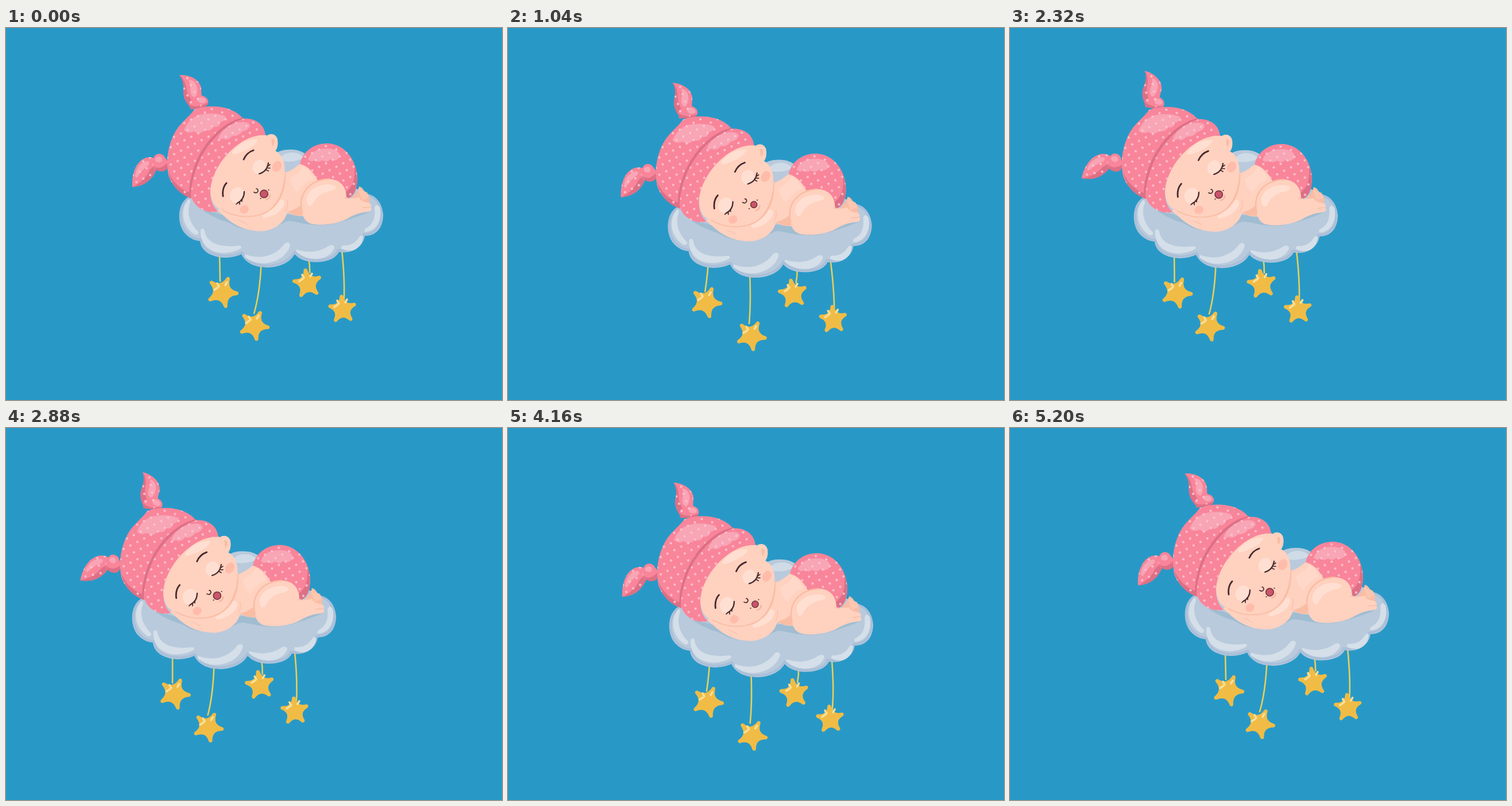
Animation, 864 px wide and 648 px high, one loop 5280 ms. Source, as an HTML page:

```html
<!DOCTYPE html>
<html lang="en">
<head>
<meta charset="utf-8">
<title>Sleeping baby on a cloud</title>
<style>
html, body { margin: 0; width: 100%; height: 100%; overflow: hidden; background: #2899c7; }
svg { display: block; width: 100vw; height: 100vh; }
.ln { fill: none; stroke-linecap: round; stroke-linejoin: round; }
.pink { fill: #f9859a; }
.rose { fill: #dd7086; }
.blush { fill: #f8a5b6; }
.skin { fill: #ffd1bf; }
.glow { fill: #ffdfd1; }
.shade { fill: #f9bda4; }
.gleam { fill: #d4dfe9; }
.ink { stroke: #46292c; }
</style>
</head>
<body>
<svg viewBox="0 0 864 648">
<defs>
  <pattern id="dots" width="19" height="19" patternUnits="userSpaceOnUse" patternTransform="rotate(18)">
    <circle cx="4.5" cy="4.5" r="2" fill="#fcc3cf"/>
    <circle cx="14" cy="14" r="2" fill="#fcc3cf"/>
  </pattern>
  <path id="crown" d="M328 142C344 134 392 131 413 158L420 170L352 230L324 296C307 290 292 279 284 260C278 238 280 210 293 184C303 165 319 155 328 142Z"/>
  <path id="brim" d="M412 158C432 156 450 166 452 187C412 183 362 232 356 280C355 298 360 312 369 319C352 325 324 313 322 288C322 232 362 172 412 158Z"/>
  <path id="pants" d="M512 237C517 214 538 200 561 201C592 203 611 231 612 262C612 282 606 296 589 297L545 270C538 253 526 240 512 237Z"/>
  <path id="earTop" d="M302 82C320 81 335 89 339 101C342 111 338 117 344 121L340 137L322 138C316 130 310 126 309 112C309 101 311 92 302 82Z"/>
  <path id="earSide" d="M220 277C218 249 231 225 251 225C258 225 262 229 264 234L262 246C255 264 241 276 220 277Z"/>
</defs>
<rect width="864" height="648" fill="#2899c7"/>
<g id="scene">
  <g id="charms"></g>

  <!-- cloud -->
  <path d="M318 294C296 309 298 345 314 360Q324 370 338 371C340 390 360 400 384 400Q400 399 410 394C420 414 442 418 460 417C482 415 496 406 503 394C514 407 535 409 551 407C568 404 576 398 580 390C604 394 622 381 625 362C648 362 657 344 657 325C655 302 642 291 626 289L560 250L530 228C520 214 505 211 491 212C478 212 466 218 460 230L340 290Z" fill="#b9cadc"/>
  <path class="ln" d="M317 297C299 311 301 343 316 358Q326 368 340 369C342 387 361 397 384 397Q400 396 411 391C421 411 442 415 460 414C480 412 495 403 503 390C515 404 535 406 550 404C567 401 575 396 578 387C602 391 620 378 623 360C646 359 654 343 654 325C653 305 643 294 630 291" stroke="#aabfd9" stroke-width="4"/>
  <path d="M474 231Q482 217 498 217Q511 217 519 226Q502 236 474 231Z" fill="#cfdce7"/>
  <g class="gleam">
    <path d="M317 299Q321 297 321 303C313 324 322 342 335 355Q336 361 329 360C304 343 304 315 317 299Z"/>
    <path d="M339 351Q344 347 346 353C349 377 378 383 407 379Q413 381 407 385C378 400 336 390 339 351Z"/>
    <path d="M416 394C443 404 469 398 486 375Q493 371 495 378C488 407 444 421 416 399Z"/>
    <path d="M506 386C529 393 546 390 563 379Q571 376 572 382C565 405 528 410 505 389Z"/>
    <path d="M585 379C600 380 610 374 616 363Q622 359 622 365C619 386 600 393 584 384Z"/>
    <path d="M625 350C639 343 644 332 642 313Q645 304 651 312C657 336 642 357 624 355Z"/>
  </g>
  <path d="M342 318Q370 321 390 331L520 323L612 316L634 320Q590 338 560 343C520 346 500 333 488 337Q445 361 403 347L388 339L373 334L358 327Z" fill="#a0bdd2"/>

  <!-- body -->
  <path class="skin" d="M474 255C496 252 507 240 514 235Q535 242 548 270L520 327Q499 330 480 315Z"/>
  <path class="glow" d="M495 261Q511 253 518 241Q530 248 535 262Q517 270 508 286Q497 278 495 261Z" opacity=".55"/>
  <path class="shade" d="M490 320Q502 318 513 309L520 326Q502 329 490 320Z"/>
  <path class="shade" d="M603 294Q613 287 615 276Q622 278 624 285Q631 285 630 291Q636 295 632 300Q636 306 629 309L607 308Z"/>
  <path class="skin" d="M613 281Q617 276 619 284Q626 281 627 288Q634 288 631 295L620 300Z" opacity=".45"/>
  <use href="#pants" class="pink"/>
  <path class="blush" d="M526 229C531 214 546 209 564 210Q582 213 582 224Q575 234 565 229Q558 236 551 230Q543 236 538 230Q531 235 526 229Z"/>
  <path class="rose" d="M606 235C616 260 613 294 594 297Q588 296 588 288C604 280 610 262 606 235Z"/>
  <use href="#pants" fill="url(#dots)"/>
  <path class="skin" d="M514 312C507 283 532 262 563 263C584 264 593 278 593 295Q602 298 615 295Q618 303 631 304Q638 307 635 312Q639 317 632 320Q615 321 600 329C580 342 550 345 532 341Q516 337 514 312Z"/>
  <path class="glow" d="M524 303C521 286 541 270 566 273Q584 278 565 284Q543 287 533 309Q526 313 524 303Z"/>
  <path class="ln" d="M516 321C508 291 526 265 562 263" stroke="#f9bda4" stroke-width="2.5"/>
  <path class="ln" d="M622 313L634 312M590 296L598 297" stroke="#f9bda4" stroke-width="1.5"/>

  <!-- arm -->
  <path class="skin" d="M367 317C383 328 398 353 445 354C470 352 489 337 491 315Q493 286 475 280L390 310Z"/>
  <path class="glow" d="M450 323Q470 315 477 299Q488 296 484 309Q477 325 452 331Q443 330 450 323Z"/>
  <path class="ln" d="M405 335Q413 337 420 342M487 319Q492 310 490 300" stroke="#fbc3ac" stroke-width="1.5"/>

  <!-- head -->
  <path class="shade" d="M374 316C394 330 425 334 452 323C479 307 488 283 487 250L470 250L380 300Z"/>
  <path class="skin" d="M449 196C452 183 469 180 473 194C475 207 471 215 463 219L452 214Z"/>
  <path class="shade" d="M462 193Q470 192 467 202Q464 211 459 207Q465 202 462 193Z"/>
  <path class="skin" d="M452 186C404 182 354 239 356 285C357 302 364 316 379 317C404 332 437 330 456 318C479 303 488 266 485 239Q481 218 467 213L459 191Z"/>
  <path class="glow" d="M397 212Q414 193 438 194Q439 200 427 208Q407 219 396 220Q392 218 397 212Z"/>
  <ellipse class="glow" cx="441" cy="242" rx="11" ry="13" transform="rotate(25 441 242)"/>
  <ellipse class="glow" cx="402" cy="291" rx="12" ry="14" transform="rotate(25 402 291)"/>
  <ellipse cx="472" cy="241" rx="7.5" ry="10" transform="rotate(28 472 241)" fill="#ffbcab"/>
  <ellipse cx="415" cy="316" rx="8" ry="7" transform="rotate(-30 415 316)" fill="#ffbcab"/>
  <g class="ln ink">
    <path id="brows" d="M414 229Q419 217 431 213M378 293Q376 279 384 270" stroke-width="2.8"/>
    <path d="M441 254Q455 250 457 235M403 305Q415 299 415 285" stroke-width="2.2"/>
    <path d="M457 240L460 238M456 244L460 244M453 247L457 249M411 299L411 302M407 303L407 307M403 305L401 307" stroke-width="1.7"/>
    <path d="M432 286Q437 289 439 284Q439 280 436 280" stroke-width="1.7"/>
    <path d="M443 297L444 297M457 282L458 282" stroke-width="1.5"/>
  </g>
  <g id="mouth">
    <path class="ln" d="M453 299Q459 298 460 291" stroke="#f7b097" stroke-width="2"/>
    <circle id="lips" cx="449.5" cy="289" fill="#c9556b" stroke="#6b3039" stroke-width="1.5"/>
  </g>

  <!-- hat -->
  <g id="top">
    <use href="#earTop" class="pink"/>
    <path class="rose" d="M302 82C314 91 313 103 316 113Q319 120 325 128L321 138Q307 124 309 108Q310 93 302 82Z"/>
    <path class="blush" d="M318 90Q331 91 333 105Q334 116 329 121Q321 119 321 108Q322 98 318 90Z"/>
    <path class="pink" d="M321 139C316 130 321 123 328 125Q333 115 345 119Q354 123 352 132Q343 141 321 139Z"/>
    <path class="rose" d="M319 133Q332 141 352 130Q352 136 345 138L322 142Z"/>
    <path class="blush" d="M333 123Q341 118 348 124Q350 130 342 131Q334 131 333 123Z"/>
    <use href="#earTop" fill="url(#dots)"/>
  </g>
  <g id="side">
    <use href="#earSide" class="pink"/>
    <path class="rose" d="M220 277Q242 267 250 248Q256 240 264 239L262 247C255 264 241 276 220 277Z"/>
    <path class="blush" d="M225 258Q227 238 244 232Q253 231 248 239Q237 246 229 260Q226 262 225 258Z"/>
    <use href="#earSide" fill="url(#dots)"/>
    <path class="pink" d="M257 231Q257 220 266 219Q274 219 277 226Q284 232 282 241Q279 249 270 247Q259 250 256 241Z"/>
    <path class="blush" d="M260 227Q266 221 271 226Q274 233 267 234Q259 234 260 227Z"/>
    <path class="rose" d="M256 240Q268 249 281 235Q284 246 276 249Q263 253 256 240Z"/>
  </g>
  <use href="#crown" class="pink"/>
  <path class="rose" d="M283 251Q296 279 321 287L323 297C303 290 288 275 283 251Z"/>
  <path class="blush" d="M310 178Q317 158 338 151Q364 146 383 154Q383 162 373 164Q372 174 361 172Q358 181 346 178Q337 187 327 180Q317 185 310 178Z"/>
  <use href="#crown" fill="url(#dots)"/>
  <use href="#brim" class="pink"/>
  <path class="blush" d="M370 191Q379 171 402 165Q424 161 425 171Q421 179 412 180Q404 190 394 188Q384 198 378 192Q373 197 370 191Z"/>
  <use href="#brim" fill="url(#dots)"/>
  <path class="rose" d="M414 156C372 163 322 218 319 286L322 294C323 227 370 171 414 158Z"/>
</g>
</svg>
<script>
const LOOP = 5280, STEP = 80, MID = 2560;
const $ = id => document.getElementById(id);

// distance in time from the far end of the sway -> offset x, y
const PATH = [
  [0, -95, -4], [240, -86, 1], [560, -69, 8.5], [880, -52, 14], [1440, -26, 18],
  [2000, -11.5, 12], [2320, -5, 6], [2560, 0, 0], [2640, 3, -3]
];

// anchor, string tip, bend, star centre, radius, turn, swing(w, s), spin per px
const CHARMS = [
  { a: [372, 394], tip: [371.5, 441], bend: [372, 420], c: [375, 460], r: 28, turn: 5, swing: w => 2 - 9 * w, spin: 0 },
  { a: [444.5, 411], tip: [432, 497], bend: [442, 463], c: [432, 518], r: 27, turn: 8, swing: w => 16 * w, spin: .15 },
  { a: [527, 400], tip: [528.5, 426], bend: [529, 413], c: [524, 445], r: 26, turn: -26, swing: w => 1 - 6 * w, spin: 0 },
  { a: [585, 387], tip: [588, 473], bend: [590, 437], c: [585, 490], r: 25, turn: -22, swing: (w, s) => 1 + 4 * s, spin: 0 }
];

function add(parent, tag, attrs) {
  const el = document.createElementNS('http://www.w3.org/2000/svg', tag);
  for (const k in attrs) el.setAttribute(k, attrs[k]);
  return parent.appendChild(el);
}

function starPath(r, turn) {
  const at = (k, rad) => {
    const a = (turn + k * 36) * Math.PI / 180;
    return (rad * Math.cos(a)).toFixed(1) + ' ' + (rad * Math.sin(a)).toFixed(1);
  };
  let d = 'M' + at(0, r);
  for (let k = 1; k < 10; k += 2) d += 'Q' + at(k, r * .22) + ' ' + at(k + 1, r);
  return d + 'Z';
}

for (const ch of CHARMS) {
  ch.line = add($('charms'), 'path', { class: 'ln', stroke: '#e9cf5a', 'stroke-width': 2.6 });
  ch.star = add($('charms'), 'g', {});
  add(ch.star, 'path', {
    d: starPath(ch.r - 3, ch.turn), fill: '#f0bc46', stroke: '#f0bc46',
    'stroke-width': 6.5, 'stroke-linejoin': 'round'
  });
  add(ch.star, 'path', {
    d: 'M-14 -4L-8 -8M-9 -15L-6 -10M5 -12L8 -17', class: 'ln',
    stroke: '#fadf9a', 'stroke-width': 3.6
  });
}

// cubic through the table, with slopes taken from the neighbours
function along(u) {
  let i = 0;
  while (i < PATH.length - 2 && u > PATH[i + 1][0]) i++;
  const slope = (n, k) => {
    const p = PATH[Math.max(0, n - 1)], q = PATH[Math.min(PATH.length - 1, n + 1)];
    return (q[k] - p[k]) / (q[0] - p[0]);
  };
  const a = PATH[i], b = PATH[i + 1], h = b[0] - a[0], f = (u - a[0]) / h;
  return [1, 2].map(k =>
    a[k] * (1 + 2 * f) * (1 - f) ** 2 + slope(i, k) * h * f * (1 - f) ** 2 +
    b[k] * f * f * (3 - 2 * f) + slope(i + 1, k) * h * f * f * (f - 1));
}

function draw(time) {
  const t = Math.floor((time % LOOP) / STEP) * STEP;
  const u = Math.abs(t - MID);
  const w = (1 - Math.cos(2 * Math.PI * u / (LOOP / 2))) / 2;
  const s = Math.sin(2 * Math.PI * t / LOOP);
  const set = (id, v) => $(id).setAttribute('transform', v);

  set('scene', `translate(${along(u)})`);
  set('top', `rotate(${18 * (MID - u) / 2320} 338 137)`);
  set('side', `rotate(${21 * Math.max(0, 1 - u / 1500) ** 1.5} 273 236)`);
  set('brows', `translate(${5 * w} ${4 * w})`);
  set('mouth', `translate(${2.2 * w} ${w})`);
  $('lips').setAttribute('r', 6.8 - 1.3 * w);

  for (const ch of CHARMS) {
    const d = ch.swing(w, s);
    const [bx, by] = ch.bend, [tx, ty] = ch.tip;
    ch.line.setAttribute('d', `M${ch.a}Q${bx + d * .3} ${by} ${tx + d * .75} ${ty}`);
    ch.star.setAttribute('transform', `translate(${ch.c[0] + d} ${ch.c[1]}) rotate(${d * ch.spin})`);
  }
}

const start = performance.now();
function tick() {
  draw(performance.now() - start);
  requestAnimationFrame(tick);
}
tick();
</script>
</body>
</html>
```
